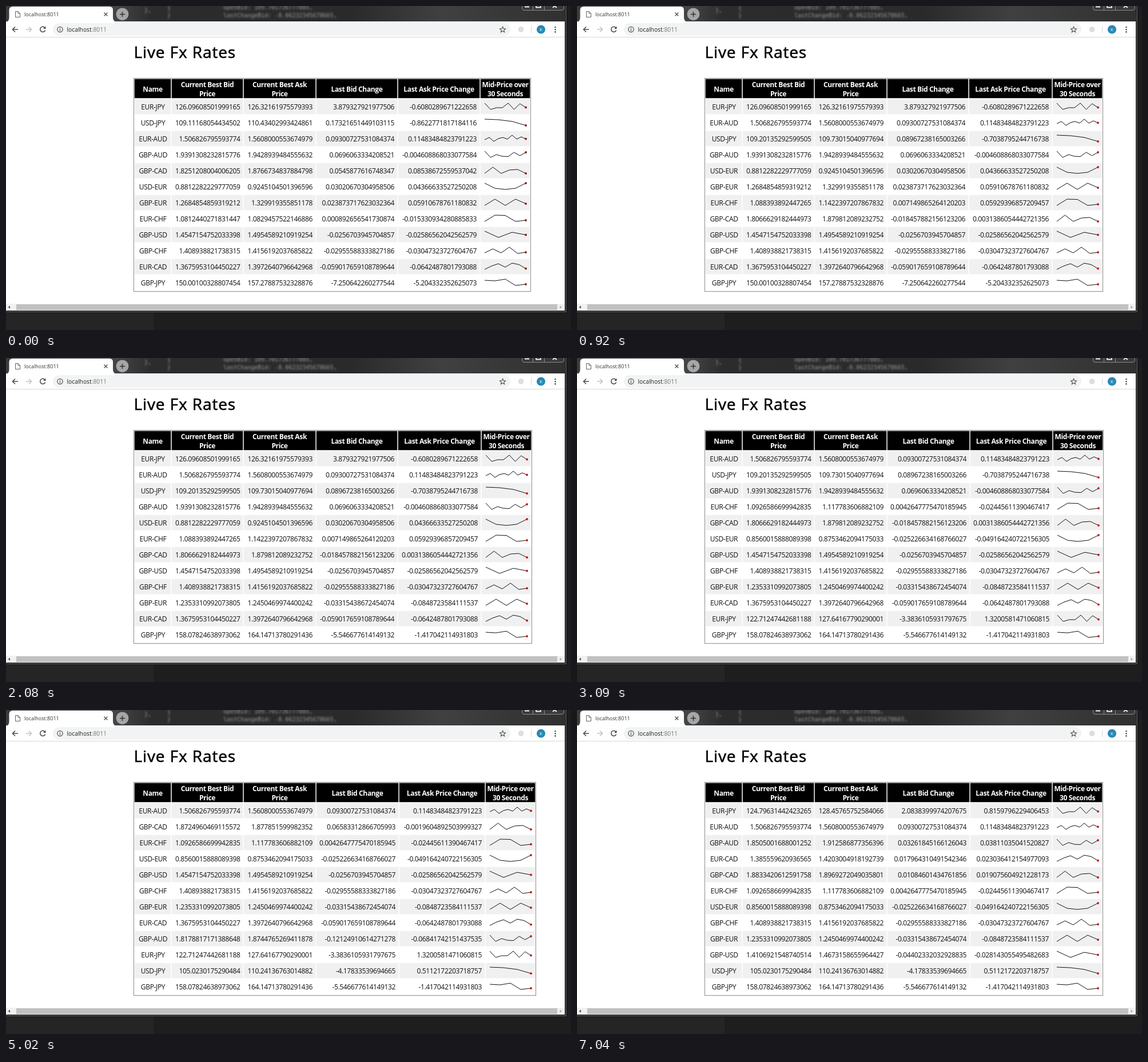
An HTML page for the animation above (8000 ms loop, 988 by 567 pixels).

```html
<!DOCTYPE html>
<html lang="en">
<head>
<meta charset="utf-8">
<title>Live Fx Rates</title>
<style>
html, body { margin: 0; height: 100%; overflow: hidden; background: #1e1e1e; }
svg { display: block; width: 100vw; height: 100vh; }
text { font-family: "Open Sans", "Noto Sans", sans-serif; }
#table text { font-size: 12px; letter-spacing: -.35px; fill: #111; }
#table .head { font-weight: 700; fill: #fff; text-anchor: middle; }
.mid { text-anchor: middle; }
.end { text-anchor: end; }
.line { fill: none; stroke: #111; stroke-width: 1; }
.icon { fill: none; stroke: #4a4d51; stroke-width: 1.6; }
.code text { font: 10px "DejaVu Sans Mono", monospace; fill: #9a9a9a; }
</style>
</head>
<body>
<svg viewBox="0 0 988 567" preserveAspectRatio="none">
  <defs>
    <linearGradient id="strip">
      <stop offset="0" stop-color="#3c3c3c"/>
      <stop offset=".2" stop-color="#444"/>
      <stop offset=".26" stop-color="#2c2c2c"/>
      <stop offset=".62" stop-color="#2a2a2a"/>
      <stop offset=".78" stop-color="#404040"/>
      <stop offset="1" stop-color="#303030"/>
    </linearGradient>
    <filter id="blur"><feGaussianBlur stdDeviation="1.4"/></filter>
  </defs>

  <!-- desktop and window frame -->
  <rect width="988" height="567" fill="#1e1e1e"/>
  <rect y="537" width="258" height="30" fill="#252526"/>
  <rect width="981" height="537" fill="#0c0c0c"/>
  <rect width="980" height="536" fill="#2b2b2b"/>
  <rect width="977" height="28" fill="url(#strip)"/>
  <path d="M979.5 0V535.5H0" fill="none" stroke="#666"/>
  <g class="code" filter="url(#blur)">
    <text x="380" y="6">openBid: 109.701736777885,</text>
    <text x="380" y="20">lastChangeBid: -0.06232345678665,</text>
    <text x="242" y="11">},</text>
    <text x="282" y="7">{</text>
    <text x="282" y="20">}</text>
  </g>
  <path d="M902.5 0V4Q902.5 7.5 906 7.5H972Q975.5 7.5 975.5 4V0M921.5 0V7M941.5 0V7" fill="#3a3a3a" stroke="#8a8a8a"/>
  <path d="M907 1.5H915M927 0V2.5H935V0M956 3L959.5 0L963 3" fill="none" stroke="#eee" stroke-width="1.8"/>

  <!-- tab -->
  <path d="M0 28Q5.500 27 5.500 20V7Q5.500 1 12 1H181Q187 1 187 7V20Q187 27 194 28Z" fill="#fff"/>
  <path d="M16.5 9.5H21L24.5 13V19.5H16.5ZM21 9.5V13H24.5" fill="none" stroke="#5f6368"/>
  <text x="32" y="17.5" font-size="9" fill="#333">localhost:8011</text>
  <path d="M171.5 11.5L177.5 17.5M177.5 11.5L171.5 17.5" stroke="#4a4d51" stroke-width="1.3"/>
  <circle cx="203.5" cy="14.2" r="10.8" fill="#a6a6a6"/>
  <path d="M199 14.5H208M203.5 10V19" stroke="#333" stroke-width="1.5"/>

  <!-- toolbar -->
  <rect y="27" width="977" height="506" fill="#fff"/>
  <rect x="82" y="30" width="800" height="22" rx="11" fill="#f1f3f4"/>
  <path d="M0 54.5H977" stroke="#d5d7da"/>
  <path class="icon" d="M21 41H11.5M16 36.5L11.5 41L16 45.5"/>
  <path class="icon" d="M35 41H44.5M40 36.5L44.5 41L40 45.5" style="stroke:#c0c2c5"/>
  <path class="icon" d="M68 38A4.6 4.6 0 1 0 68.6 42.5"/>
  <path d="M69.5 35.5V40H65Z" fill="#4a4d51"/>
  <circle class="icon" cx="94.5" cy="41" r="4.7" style="stroke-width:1.2"/>
  <path d="M94.5 40.3V43.8M94.5 38.2V39.4" stroke="#4a4d51" stroke-width="1.2"/>
  <text x="106.5" y="45" font-size="10.3" fill="#222">localhost<tspan fill="#777">:8011</tspan></text>
  <path class="icon" d="M868.5 36.2L869.9 39.6L873.5 39.9L870.7 42.2L871.6 45.7L868.5 43.8L865.4 45.7L866.3 42.2L863.5 39.9L867.1 39.6Z" style="stroke-width:1.1"/>
  <circle cx="900.5" cy="41" r="5" fill="#dedede"/>
  <path d="M918.5 35V47" stroke="#d5d7da"/>
  <circle cx="935.5" cy="41" r="7.6" fill="#2689b5"/>
  <text class="mid" x="935.5" y="44" font-size="8" fill="#fff">K</text>
  <g fill="#4a4d51"><circle cx="960.5" cy="37" r="1.3"/><circle cx="960.5" cy="41.2" r="1.3"/><circle cx="960.5" cy="45.4" r="1.3"/></g>

  <!-- page -->
  <text x="223.5" y="91" font-size="28" stroke="#000" stroke-width=".6" letter-spacing=".9">Live Fx Rates</text>
  <g id="table"></g>
  <rect y="521" width="977" height="12" fill="#f1f1f1"/>
  <rect x="18" y="522" width="946" height="10" fill="#c1c1c1"/>
  <path d="M7 524.5V529.5L3.5 527Z" fill="#505050"/>
  <path d="M968.5 524.5V529.5L972 527Z" fill="#a3a3a3"/>
</svg>
<script>
// pair, bid, ask, bid change, ask change
const start = `EUR-JPY 126.09608501999165 126.32161975579393 3.879327921977506 -0.6080289671222658
USD-JPY 109.11168054434502 110.43402993424861 0.17321651449103115 -0.8622771817184116
EUR-AUD 1.506826795593774 1.5608000553674979 0.09300727531084374 0.11483484823791223
GBP-AUD 1.9391308232815776 1.9428939484555632 0.0696063334208521 -0.004608868033077584
GBP-CAD 1.8251208004006205 1.8766734837884798 0.0545877616748347 0.08538672559537042
USD-EUR 0.8812282229777059 0.9245104501396596 0.03020670304958506 0.04366633527250208
GBP-EUR 1.2684854859319212 1.329919355851178 0.023873717623032364 0.05910678761180832
EUR-CHF 1.0812440271831447 1.0829457522146886 0.000892656541730874 -0.015330934280885833
GBP-USD 1.4547154752033398 1.4954589210919254 -0.0256703945704857 -0.02586562042562579
GBP-CHF 1.408938821738315 1.4156192037685822 -0.02955588333827186 -0.03047323727604767
EUR-CAD 1.3675953104450227 1.3972640796642968 -0.059017659108789644 -0.0642487801793088
GBP-JPY 150.00100328807454 157.27887532328876 -7.250642260277544 -5.204332352625073`;

// time, right edges of the two change columns, then new prices
const ticks = [
  [0, 684, 828, ""],
  [70, 684, 830, `USD-JPY 109.20135292599505 109.73015040977694
EUR-CHF 1.088393892447265 1.1422397207867832
GBP-CAD 1.8066629182444973 1.879812089232752`],
  [1090, 684, 830, `GBP-JPY 163.62492400387975 165.56417991784616`],
  [2080, 684, 830, `GBP-JPY 158.07824638973062 164.14713780291436
GBP-EUR 1.2353310992073805 1.2450469974400242`],
  [3090, 686, 831, `EUR-CHF 1.0926586699942835 1.117783606882109
USD-EUR 0.8560015888089398 0.8753462094175033
EUR-JPY 122.71247442681188 127.64167790290001`],
  [4010, 686, 831, `GBP-AUD 1.8178817171388648 1.8744765269411878`],
  [5020, 686, 837, `GBP-CAD 1.8724960469115572 1.877851599982352
USD-JPY 105.0230175290484 110.24136763014882`],
  [6030, 686, 830, `EUR-CAD 1.385559620936565 1.4203004918192739
GBP-CAD 1.8833420612591758 1.8969272049035801
GBP-USD 1.4106921548740514 1.4673158655964427`],
  [7040, 686, 830, `EUR-JPY 124.79631442423265 128.45765752584066
GBP-AUD 1.8505001688001252 1.912586877356396`]
];

// sparkline heights around the middle of the row
const sparks = {
  "EUR-JPY": [-7, 4, 1, 1, -7, 4, -6, .5],
  "USD-JPY": [-7, -6, -3, 4],
  "EUR-AUD": [1, -3, 4, -1, -3, 0, -7, 0, -4, -.5],
  "GBP-AUD": [-7, 4, -1, 2, 2.5, -5, 1, -5],
  "GBP-CAD": [4, -7, 4, -2, -3, 4],
  "USD-EUR": [-7, 2, 4, 2, -7],
  "GBP-EUR": [4, -7, 4, -7, 1],
  "EUR-CHF": [4, -7, -6.5, 4, 2],
  "GBP-USD": [-7, 4, -5, -.5],
  "GBP-CHF": [3, -4, 3, -7, 4, 2],
  "EUR-CAD": [4, -2, -6, 0, -7, -4.5, 2.5],
  "GBP-JPY": [-5, -4, -7, 4, 2]
};

const parse = s => s ? s.split("\n").map(l => l.split(" ")) : [];
const text = (x, y, s, cls) => `<text x="${x}" y="${y}" class="${cls}">${s}</text>`;
const cell = ([l, r], y, h, fill) =>
  `<rect x="${l - .25}" y="${y - .25}" width="${r - l + .5}" height="${h + .5}" fill="${fill}"/>`;

function spark(pair, x, y, dot) {
  const h = sparks[pair], step = 72 / (h.length - 1);
  const points = h.map((v, i) => `${x + i * step},${y + v}`).join(" ");
  return `<polyline class="line" points="${points}"/>
    <circle cx="${x + 72}" cy="${y + h[h.length - 1]}" r="1.9" fill="${dot}"/>`;
}

function drawTable(rows, a, b, dot) {
  const cols = [[225, 288], [290, 414], [416, 541], [543, a], [a + 2, b], [b + 2, b + 88]];
  const heads = ["Name", "Current Best Bid|Price", "Current Best Ask|Price",
    "Last Bid Change", "Last Ask Price Change", "Mid-Price over|30 Seconds"];
  const ends = [0, 409.5, 536, a - 5, b - 5];
  let out = `<rect x="223.5" y="126.5" width="${b - 134}" height="373" fill="#fff" stroke="#8c8c8c"/>`;
  cols.forEach((col, c) => {
    out += cell(col, 128, 33, "#000");
    const lines = heads[c].split("|");
    lines.forEach((s, i) => {
      out += text((col[0] + col[1]) / 2, lines.length > 1 ? 142 + 15.5 * i : 149.5, s, "head");
    });
  });
  rows.forEach((row, i) => {
    const y = 177 + 28 * i;
    if (i % 2 == 0) for (const col of cols) out += cell(col, y - 14, 26, "#f0f0f0");
    out += text(257, y + 4, row[0], "mid");
    for (let c = 1; c < 5; c++) out += text(ends[c], y + 4, row[c], "end");
    out += spark(row[0], b + 9, y, dot);
  });
  return out;
}

const quotes = {};
for (const row of parse(start)) quotes[row[0]] = row;
const views = ticks.map(([time, a, b, changes]) => {
  for (const [pair, bid, ask] of parse(changes)) {
    const old = quotes[pair];
    quotes[pair] = [pair, bid, ask, bid - old[1], ask - old[2]];
  }
  const rows = Object.values(quotes).sort((p, q) => q[3] - p[3]);
  return drawTable(rows, a, b, time ? "#d01010" : "#8c1c08");
});

const table = document.getElementById("table");
let shown = -1;
function frame() {
  const t = performance.now() % 8000;
  const now = ticks.filter(k => k[0] <= t).length - 1;
  if (now != shown) table.innerHTML = views[shown = now];
  requestAnimationFrame(frame);
}
frame();
</script>
</body>
</html>
```
